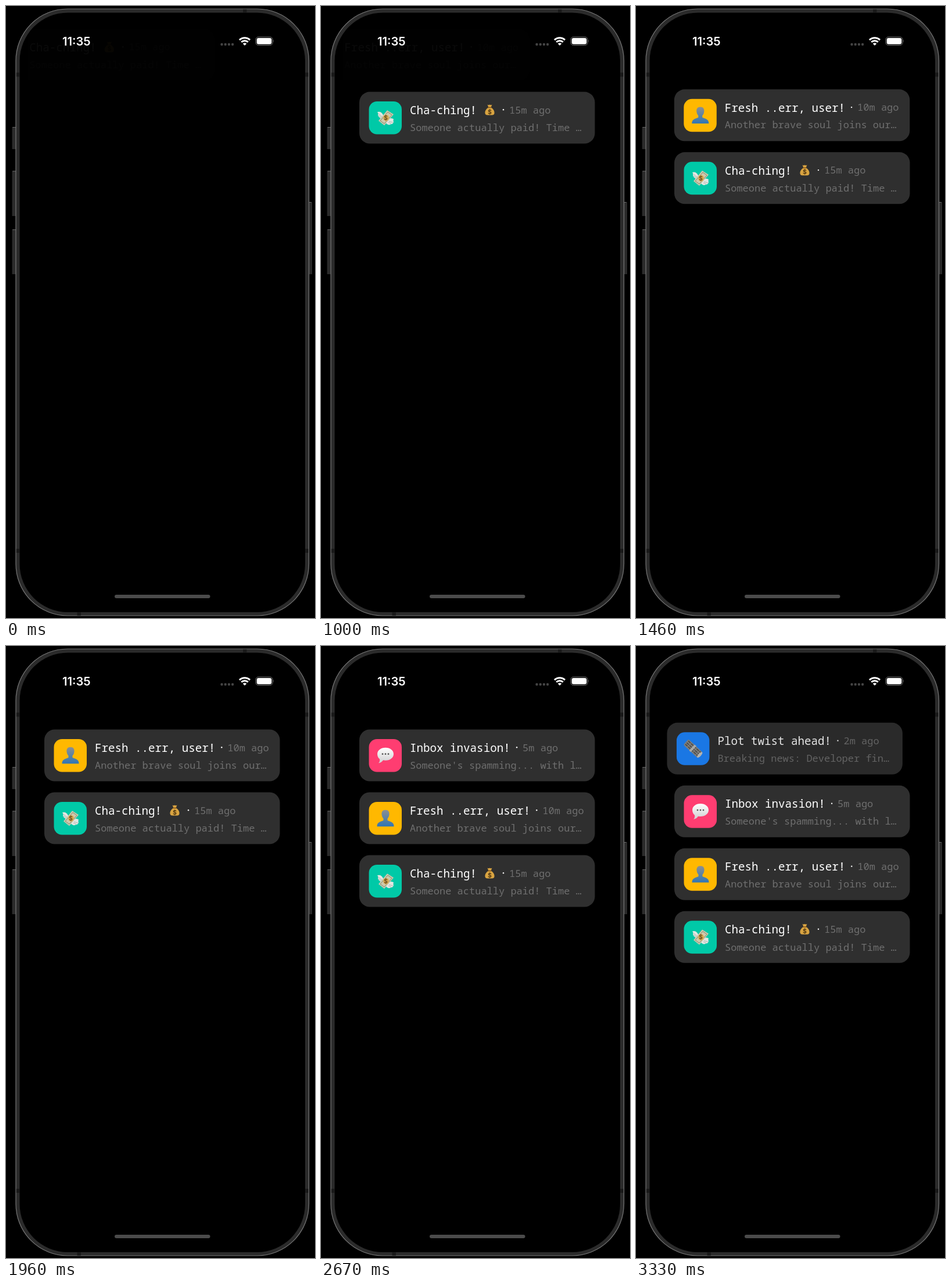
An HTML page for the animation above (3.38 s loop, 532 by 1052 pixels).

```html
<!DOCTYPE html>
<html lang="en">
<head>
<meta charset="utf-8">
<title>Notifications</title>
<style>
  html, body { margin: 0; width: 100%; height: 100%; overflow: hidden; background: #000; }
  svg { display: block; }
  .title { font: 500 19.2px "Noto Sans Mono", monospace; fill: #fff; }
  .body { font: 400 17px "Noto Sans Mono", monospace; fill: #6f6f6f; }
  .clock { font: 600 20.2px Inter, sans-serif; fill: #fff; }
</style>
</head>
<body>
<svg width="532" height="1052" viewBox="0 0 532 1052">
  <defs>
    <clipPath id="list"><rect x="38" y="20" width="462" height="1000"/></clipPath>
    <linearGradient id="person" x2="0" y2="1">
      <stop stop-color="#8b8f92"/><stop offset="1" stop-color="#2f76b5"/>
    </linearGradient>
    <linearGradient id="bubble" x2="0" y2="1">
      <stop stop-color="#fff"/><stop offset="1" stop-color="#cfcfd1"/>
    </linearGradient>
  </defs>

  <g fill="#2b2b2b">
    <path d="M17 208h-4q-2.500 0-2.500 2v36H17zM17 283.500h-4q-2.500 0-2.500 2V361H17zM17 384h-4q-2.500 0-2.500 2v75H17zM521 337h4q2 0 2 2v122h-6z"/>
    <path d="M11 208.500h6M11 284h6M11 384.500h6M521 337.500h5" stroke="#666"/>
    <rect x="17" y="5" width="504.500" height="1043" rx="89" stroke="#777" stroke-width="1.200"/>
    <path d="M408 8.500h6.500M20.500 114.500v7M518 114.500v7M20.500 933v7M518 933v7M122.500 1045h6.500" stroke="#1a1a1a" stroke-width="5.500"/>
    <rect x="23.500" y="11.500" width="491.500" height="1030.500" rx="83" fill="#000"/>
  </g>

  <g id="cards" clip-path="url(#list)"></g>

  <text class="clock" x="97" y="67.700">11:35</text>
  <path d="M371.500 66h.01M377.700 66h.01M383.900 66h.01M390.100 66h.01" stroke="#444" stroke-width="4.400" stroke-linecap="round"/>
  <g fill="none" stroke="#fff" stroke-width="3">
    <path d="M402 58.300a13 13 0 0 1 18 0M405.200 62a8.300 8.300 0 0 1 11.600 0"/>
    <path d="M411 68l-3.200-3.200a4.600 4.600 0 0 1 6.400 0z" fill="#fff" stroke="none"/>
  </g>
  <rect x="430" y="53.200" width="29" height="14.300" rx="4.500" fill="none" stroke="#777"/>
  <rect x="431.700" y="54.900" width="25.600" height="10.900" rx="3" fill="#fff"/>
  <path d="M460.300 58q1.700 2.300 0 4.700z" fill="#777"/>
  <rect x="187" y="1012" width="164.500" height="6" rx="3" fill="#4b4b4b"/>
</svg>

<script>
const LOOP = 3380, FPS = 24, DURATION = 550;
const TOP = 143.5, PITCH = 108, SLIDE = 117;

const cash = `
  <path d="M-4-5Q-8-12-14-10Q-12-8-13-5Q-12-1-9 0Q-8 4-3 3z" fill="#e4e7e3"/>
  <path d="M4 3Q8-1 14 2Q13 4 14 7Q13 11 9 11Q5 14 0 8z" fill="#e4e7e3"/>
  <path d="M-12-7l6 5M-12-4l6 4M6 6l7 2M5 8l5 2" stroke="#aab8b0"/>
  <path d="M3-13L14-6L-2 13L-12 5z" fill="#cfc9ae"/>
  <path d="M4-10L11-5L-2 10L-9 5z" fill="none" stroke="#7f8b6d"/>
  <ellipse cx="1" cy="0" rx="5" ry="5.500" fill="#d9ad55"/>
  <text x="-2.700" y="3.700" font-family="Inter, sans-serif" font-size="10" font-weight="700" fill="#6b4e20">$</text>`;
const person = `
  <path d="M0-14.500c5 0 7 3.500 6.500 8c-.4 4-2 5.500-3 7v3c3 1.800 11 2.500 11 9.500v1h-29v-1c0-7 8-7.700 11-9.500v-3c-1-1.500-2.600-3-3-7c-.5-4.500 1.500-8 6.500-8z" fill="url(#person)"/>`;
const bubble = `
  <path d="M0-13.500c8 0 14 4.700 14 11s-6 11-14 11q-2 0-4-.4q-3 4.500-8 5q3-3 2-7c-2.500-2-4-5-4-8.600c0-6.300 6-11 14-11z" fill="url(#bubble)"/>
  <path d="M-5-2.500h.01M0-2.500h.01M5-2.500h.01" stroke="#555" stroke-width="2.800" stroke-linecap="round"/>`;
const paper = `
  <g transform="rotate(43)">
    <rect x="-17" y="-6.500" width="33" height="13" rx="2.500" fill="#8c8c89"/>
    <path d="M-15-4h30M-15 0h29M-15 3.500h30" stroke="#4b4b4b" stroke-width="1.500" stroke-dasharray="5 1.500"/>
    <ellipse cx="15.500" rx="2.500" ry="6.300" fill="#c9c9c5"/>
    <rect x="-3" y="-7" width="4" height="14" fill="#bdbdb9"/>
  </g>`;
const moneyBag = `
  <g transform="translate(290.500 31)">
    <path d="M-4-9q2 1.500 4 0q2 1.500 4 0l-2 5c4 2 6.500 6 6 10q-.5 3-4 3h-8q-3.500 0-4-3c-.5-4 2-8 6-10z" fill="#d9a441"/>
    <path d="M-3-4h6" stroke="#8a5a1c" stroke-width="1.800"/>
    <text x="-3.200" y="7" font-family="Inter, sans-serif" font-size="10" font-weight="700" fill="#4e3510">$</text>
  </g>`;

// end: x where the title ends; start: when the card begins to enter
const items = [
  { title: "Cha-ching!", extra: moneyBag, end: 302.7, time: "15m", body: "Someone actually paid! Time …", color: "#00c9a7", icon: cash, start: -33, bodyY: 67.8 },
  { title: "Fresh ..err, user!", end: 360, time: "10m", body: "Another brave soul joins our…", color: "#ffb800", icon: person, start: 925 },
  { title: "Inbox invasion!", end: 325.8, time: "5m", body: "Someone's spamming... with l…", color: "#ff3d71", icon: bubble, start: 1946 },
  { title: "Plot twist ahead!", end: 348.8, time: "2m", body: "Breaking news: Developer fin…", color: "#1e86ff", icon: paper, start: 2911 },
];

const cardMarkup = ({ title, extra = "", end, time, body, color, icon, bodyY = 67 }) => `
  <g>
    <rect x="66" width="405.500" height="89" rx="18" fill="#2f2f2f"/>
    <rect x="82.500" y="16.500" width="56.500" height="56.500" rx="14" fill="${color}"/>
    <g transform="translate(111 44.700)">${icon}</g>
    <text class="title" x="153" y="38.300">${title}</text>${extra}
    <circle cx="${end + 11.3}" cy="30.800" r="1.200" fill="#fff"/>
    <text class="body" x="${end + 21.3}" y="37">${time} ago</text>
    <text class="body" x="153" y="${bodyY}">${body}</text>
  </g>`;

const list = document.getElementById("cards");
list.innerHTML = items.map(cardMarkup).join("");
const cards = [...list.children];

function progress(t, start) {
  const u = Math.min(1, Math.max(0, (t - start) / DURATION));
  const p = u < 0.5 ? 2 * u * u : 1 - 2 * (1 - u) ** 2;
  return p < 0.015 ? 0 : p;
}

function draw(now) {
  // whole steps of 24 per second; the first and last steps are held
  const step = Math.floor(((now % LOOP) + 5) * FPS / 1000);
  const t = Math.min(80, Math.max(1, step)) * 1000 / FPS;
  let y = TOP;
  for (let i = items.length - 1; i >= 0; i--) {
    const p = progress(t, items[i].start);
    y -= PITCH * (1 - p);
    cards[i].setAttribute("transform", `translate(${-SLIDE * (1 - p)} ${y})`);
    cards[i].setAttribute("opacity", p);
    y += PITCH;
  }
}

const begin = performance.now();
function tick() {
  draw(performance.now() - begin);
  requestAnimationFrame(tick);
}
tick();
</script>
</body>
</html>
```
